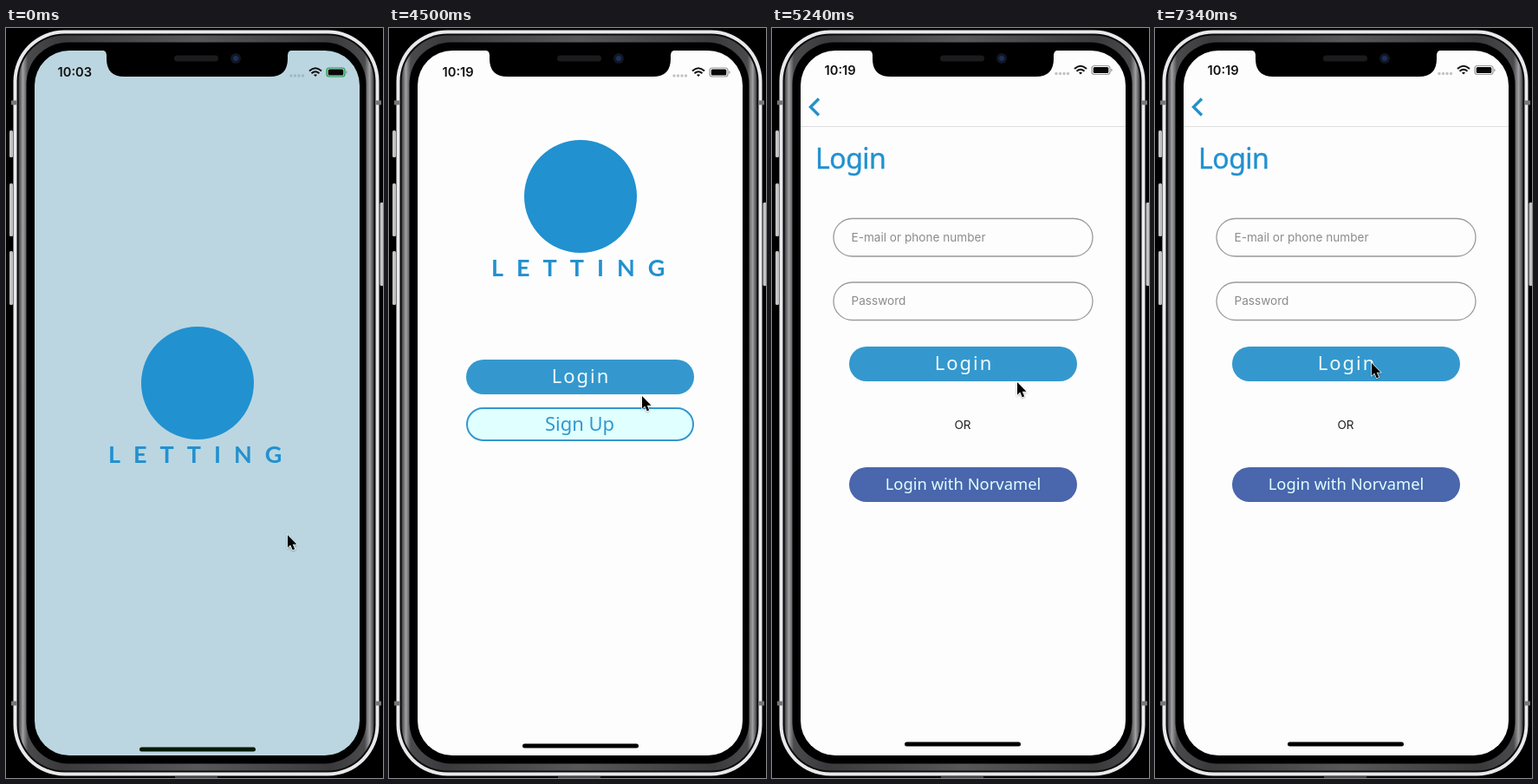
An HTML page that plays this animation: 435x864 px, repeating every 8 s.

```html
<!DOCTYPE html>
<html lang="en">
<head>
<meta charset="utf-8">
<title>Rental app sign-in</title>
<style>
  html, body { margin: 0; width: 100%; height: 100%; overflow: hidden; background: #000; }
  svg { display: block; }
  text { font-family: "Noto Sans", sans-serif; }
  .ui { font-family: Inter, sans-serif; font-size: 13.6px; }
  .hint { fill: #8b8b8d; }
  .center { text-anchor: middle; }
  .button { font-size: 22px; }
  .wide { letter-spacing: 2px; }
  .field { fill: #fdfdfd; stroke: #9b9b9b; stroke-width: 1.3; }
  #clock { font-size: 14.7px; font-weight: 600; fill: #111; }
  #dots { fill: #c3c3c5; }
  .shell { fill: none; stroke: #000; }
  .splash #screen { fill: #bbd6e0; }
  .splash #dots { fill: #9db8c2; }
  .splash #battery { stroke: #1b9a3c; }
  .splash #homeBar { fill: #031a06; }
</style>
</head>
<body>
<svg id="phone" width="435" height="864" viewBox="0 0 435 864">
  <defs>
    <linearGradient id="metal" x2="1">
      <stop offset="0" stop-color="#3c3c3e"/>
      <stop offset=".012" stop-color="#a0a0a2"/>
      <stop offset=".026" stop-color="#4a4a4c"/>
      <stop offset=".12" stop-color="#3a3a3c"/>
      <stop offset=".5" stop-color="#58585a"/>
      <stop offset=".88" stop-color="#3a3a3c"/>
      <stop offset=".974" stop-color="#4a4a4c"/>
      <stop offset=".988" stop-color="#a0a0a2"/>
      <stop offset="1" stop-color="#3c3c3e"/>
    </linearGradient>
    <filter id="shadow" x="-50%" y="-50%" width="200%" height="200%">
      <feDropShadow dx="0" dy="1" stdDeviation=".8" flood-opacity=".35"/>
    </filter>
  </defs>

  <rect width="435" height="864"/>
  <g fill="#c4c4c6">
    <rect x="4" y="118" width="4" height="31" rx="1.5"/>
    <rect x="4" y="179" width="4" height="61" rx="1.5"/>
    <rect x="4" y="257" width="4" height="62" rx="1.5"/>
    <rect x="431.5" y="201" width="4" height="96" rx="1.5"/>
  </g>
  <rect x="8.5" y="2.5" width="422" height="859" rx="59" fill="#e9e9eb"/>
  <rect x="12.5" y="6.5" width="414" height="851" rx="55" fill="#0b0b0c"/>
  <rect x="14.5" y="8.5" width="410" height="847" rx="53" fill="url(#metal)"/>
  <rect x="23.5" y="16.5" width="392" height="831" rx="48"/>
  <path d="M6 86h7M426 86h7M6 778h7M426 778h7" stroke="#77777a" stroke-width="5"/>
  <path d="M195 863h49" stroke="#444" stroke-width="2"/>
  <rect id="screen" x="33" y="26" width="375" height="812" rx="40" fill="#fdfdfd"/>

  <path d="M110 25.5q6 0 6 6v4q0 20.500 20.500 20.500h168q20.500 0 20.500-20.500v-4q0-6 6-6z"/>
  <rect x="194" y="31.500" width="51" height="7" rx="3.500" fill="#1b1b1d"/>
  <circle cx="265" cy="35" r="6" fill="#111722"/>
  <circle cx="265" cy="35" r="3" fill="#1c2f5c"/>

  <g id="status">
    <text id="clock" class="ui" x="61" y="56"></text>
    <g id="dots">
      <circle cx="329" cy="55" r="1.700"/><circle cx="333.500" cy="55" r="1.700"/>
      <circle cx="338" cy="55" r="1.700"/><circle cx="342.500" cy="55" r="1.700"/>
    </g>
    <g fill="none" stroke="#111" stroke-width="2">
      <path d="M350 49.500q7-6.500 14 0M352.500 52.300q4.500-4 9 0"/>
      <path d="M355 54l2 2 2-2q-2-1.500-4 0z" fill="#111" stroke="none"/>
    </g>
    <rect id="battery" x="370" y="46" width="21" height="10" rx="3" fill="none" stroke="#98989a" stroke-width="1.200"/>
    <rect x="371.700" y="47.600" width="17.600" height="6.800" rx="1.500" fill="#080808"/>
    <path d="M392.800 49.500v3" stroke="#98989a" stroke-width="1.200"/>
  </g>

  <g id="brand" fill="#2191d0">
    <circle cx="221" cy="194" r="65"/>
    <text x="118" y="286" style="font: 700 27px Lato, sans-serif; letter-spacing: 15px">LETTING</text>
  </g>

  <g id="welcome">
    <rect x="89" y="382" width="263" height="40" rx="20" fill="#3498ce"/>
    <text class="button wide center" x="221.500" y="409" fill="#f2fdff">Login</text>
    <rect x="90" y="438" width="261" height="37" rx="18.500" fill="#e0ffff" stroke="#3498ce" stroke-width="2"/>
    <text class="button center" x="220" y="464" fill="#3498ce">Sign Up</text>
  </g>

  <g id="login">
    <path d="M54 81.500L44.500 91l9.500 9.500" fill="none" stroke="#2590c8" stroke-width="3.400"/>
    <path d="M33 113.500h375" stroke="#dededf"/>
    <text x="50" y="162" font-size="32" letter-spacing="-.5" fill="#2191d0" stroke="#2191d0" stroke-width=".4">Login</text>
    <rect class="field" x="71" y="219.500" width="299" height="43.500" rx="21.750"/>
    <text class="ui hint" x="91.500" y="245.500">E-mail or phone number</text>
    <rect class="field" x="71" y="293" width="299" height="43.500" rx="21.750"/>
    <text class="ui hint" x="91.500" y="319">Password</text>
    <rect x="89" y="367" width="263" height="40" rx="20" fill="#3498ce"/>
    <text class="button wide center" x="221.500" y="394" fill="#f2fdff">Login</text>
    <text class="ui center" x="220" y="462" fill="#222">OR</text>
    <rect x="89" y="506" width="263" height="40" rx="20" fill="#4a66ac"/>
    <text class="center" x="220.500" y="532" font-size="18.400" fill="#e0ffff">Login with Norvamel</text>
  </g>

  <rect id="homeBar" x="154" y="824.500" width="134" height="5" rx="2.500"/>
  <path id="cursor" d="M0 0v14.500l3.300-3 2.400 5.700 2.500-1-2.400-5.500h4.700z" stroke="#fff" stroke-width="1.200" paint-order="stroke" filter="url(#shadow)"/>
</svg>
<script>
  const LOOP = 8000, WELCOME_AT = 1350, LOGIN_AT = 5240;
  // Pointer steps: time, x, y
  const pointer = [
    [0, 325, 584], [4350, 312, 508], [4500, 292, 424], [4640, 286, 410],
    [4790, 283, 408], [6440, 282, 407], [6590, 276, 401], [6740, 269, 396],
    [6890, 265, 394], [7040, 261, 391], [7190, 253, 387], [7340, 250, 386]
  ];
  const el = id => document.getElementById(id);
  const show = (id, on) => el(id).setAttribute("display", on ? "inline" : "none");
  const move = (id, x, y) => el(id).setAttribute("transform", `translate(${x} ${y})`);

  function draw(now) {
    const t = now % LOOP;
    const splash = t < WELCOME_AT, login = t >= LOGIN_AT;
    el("phone").classList.toggle("splash", splash);
    el("clock").textContent = splash ? "10:03" : "10:19";
    el("clock").setAttribute("x", splash ? 59.5 : 61.5);
    show("brand", !login);
    show("welcome", !splash && !login);
    show("login", login);
    move("brand", 0, splash ? 215 : 0);
    move("status", login ? -1 : 0, login ? -2.5 : 0);
    move("homeBar", login ? -1 : 0, splash ? 4 : login ? -2 : 0);
    const [, x, y] = pointer.findLast(step => step[0] <= t);
    move("cursor", x, y);
    requestAnimationFrame(() => draw(performance.now()));
  }
  draw(0);
</script>
</body>
</html>
```
